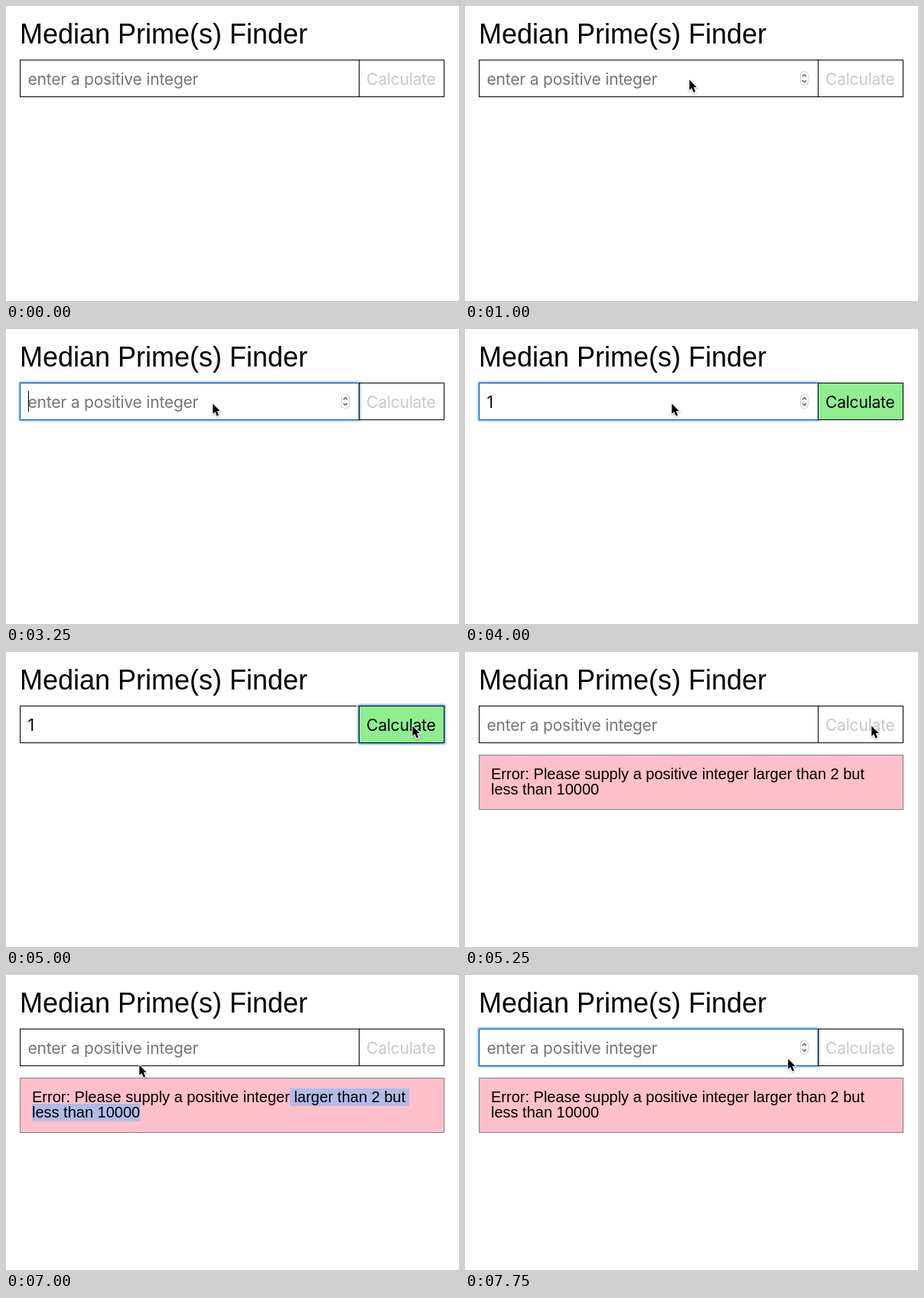
Write an HTML page with a canvas that moves like this. It is 592 px wide and 385 px high and loops after 8000 ms.

```html
<!DOCTYPE html>
<html lang="en">
<head>
<meta charset="utf-8">
<title>Median Prime(s) Finder</title>
<style>
html, body { margin: 0; width: 100%; height: 100%; overflow: hidden; background: #fff; }
canvas { display: block; }
</style>
</head>
<body>
<canvas id="stage" width="592" height="385"></canvas>
<script>
const ctx = document.getElementById('stage').getContext('2d');
const LOOP = 8000;
const SANS = '"Liberation Sans", Arial, sans-serif';
const UI = '21px Inter, sans-serif';

// Pointer: start time, tip x, tip y, shape
const pointer = [
  [250, 372, 49, 'arrow'], [500, 309, 82, 'arrow'], [750, 296, 95, 'arrow'],
  [1000, 293, 96, 'arrow'], [1250, 270, 97, 'arrow'], [4500, 330, 98, 'arrow'],
  [4750, 561, 96, 'arrow'], [5000, 531, 96, 'arrow'], [5750, 298, 174, 'arrow'],
  [6000, 344, 158, 'beam'], [6250, 444, 166, 'beam'], [6500, 521, 180, 'arrow'],
  [6750, 521, 183, 'arrow'], [7000, 174, 117, 'arrow'], [7250, 176, 103, 'arrow'],
  [7500, 300, 106, 'arrow'], [7750, 422, 109, 'arrow']
];

const within = (t, from, to) => t >= from && t < to;
const blink = (t, start) => Math.floor((t - start) / 500) % 2 === 0;

function stateAt(t) {
  const typed = within(t, 3500, 5250);
  const focusStart = t >= 7250 ? 7250 : t >= 3500 ? 3500 : 1250;
  const focused = within(t, 1250, 5000) || t >= 7250;
  return {
    typed,
    focused,
    caret: focused && blink(t, focusStart),
    spinner: focused || within(t, 1000, 1250),
    pressed: within(t, 5000, 5250),
    error: t >= 5250,
    selection: within(t, 6250, 6500) ? 1 : within(t, 6500, 7250) ? 2 : 0,
    pointer: pointer.filter(p => p[0] <= t).pop()
  };
}

function text(str, x, y, font, color, spacing = '0px') {
  ctx.font = font;
  ctx.fillStyle = color;
  ctx.letterSpacing = spacing;
  ctx.fillText(str, x, y);
}

const label = (str, x, color) => text(str, x, 103, UI, color, '-0.2px');

function fill(x, y, w, h, color) {
  ctx.fillStyle = color;
  ctx.fillRect(x, y, w, h);
}

function outline(x, y, w, h, color) {
  ctx.strokeStyle = color;
  ctx.lineWidth = 1;
  ctx.strokeRect(x + 0.5, y + 0.5, w - 1, h - 1);
}

// Soft halo made of one-pixel rounded outlines
function halo(x, y, w, h, colors) {
  ctx.lineWidth = 1;
  colors.forEach((color, i) => {
    const d = i + 0.5;
    ctx.strokeStyle = color;
    ctx.beginPath();
    ctx.roundRect(x - d, y - d, w + 2 * d, h + 2 * d, i + 1);
    ctx.stroke();
  });
}

function drawSpinner() {
  ctx.lineWidth = 1;
  ctx.strokeStyle = '#d2d2d2';
  ctx.fillStyle = '#fff';
  ctx.beginPath();
  ctx.roundRect(438.5, 85.5, 10, 18, 4.5);
  ctx.fill();
  ctx.stroke();
  ctx.strokeStyle = '#444';
  ctx.lineWidth = 1.2;
  ctx.beginPath();
  for (const [y, d] of [[92, -2.5], [97, 2.5]]) {
    ctx.moveTo(441, y);
    ctx.lineTo(443.5, y + d);
    ctx.lineTo(446, y);
  }
  ctx.stroke();
}

function drawInput(s) {
  outline(18, 70, 444, 49, '#000');
  if (s.focused) {
    halo(18, 70, 444, 49, ['#8abdf5', '#c3defb', '#edf5fe']);
    outline(18, 70, 444, 49, '#1767c0');
    outline(19, 71, 442, 47, '#c6dffa');
  }
  if (s.typed) label('1', 28.5, '#000');
  else label('enter a positive integer', 28.5, '#757575');
  if (s.caret) fill(s.typed ? 40 : 29, 81, 1, 27, '#000');
  if (s.spinner) drawSpinner();
}

function drawButton(s) {
  if (s.typed) fill(461, 70, 112, 49, '#90ee90');
  if (s.pressed) halo(461, 70, 112, 49, ['#83bbf8', '#a2cdfb', '#dcecfe']);
  outline(461, 70, 112, 49, '#000');
  label('Calculate', 471, s.typed ? '#000' : '#c8c8c8');
}

function drawError(s) {
  fill(18, 134, 555, 72, '#ffc0cb');
  outline(18, 134, 555, 72, '#808080');
  const blue = '#b1bbe7';
  if (s.selection) fill(371, 148, s.selection === 1 ? 71 : 156, 23, blue);
  if (s.selection === 2) fill(34, 168, 141, 23, blue);
  const font = '20px ' + SANS;
  text('Error: Please supply a positive integer larger than 2 but', 34, 166, font, '#000');
  text('less than 10000', 34, 186, font, '#000');
}

function drawArrow() {
  const points = [[0, 0], [0, 13.2], [3, 10.4], [5.4, 16], [7.8, 15], [5.4, 9.5], [9.5, 9.5]];
  ctx.beginPath();
  points.forEach(([x, y]) => ctx.lineTo(x + 0.3, y + 0.6));
  ctx.closePath();
  ctx.lineJoin = 'miter';
  ctx.strokeStyle = '#fff';
  ctx.lineWidth = 2;
  ctx.shadowColor = 'rgba(0,0,0,.3)';
  ctx.shadowBlur = 2;
  ctx.shadowOffsetY = 1;
  ctx.stroke();
  ctx.shadowColor = 'transparent';
  ctx.fillStyle = '#000';
  ctx.fill();
}

function drawBeam() {
  const trace = (color, width) => {
    ctx.strokeStyle = color;
    ctx.lineWidth = width;
    ctx.beginPath();
    for (const d of [-1, 1]) {
      ctx.moveTo(-2.5, 8 * d);
      ctx.quadraticCurveTo(0.5, 8 * d, 0.5, 6 * d);
      ctx.quadraticCurveTo(0.5, 8 * d, 3.5, 8 * d);
    }
    ctx.moveTo(0.5, -7);
    ctx.lineTo(0.5, 7);
    ctx.moveTo(-1.5, 3.5);
    ctx.lineTo(2.5, 3.5);
    ctx.stroke();
  };
  trace('rgba(255,255,255,.6)', 2.5);
  trace('#000', 1);
}

function drawPointer([, x, y, shape]) {
  ctx.save();
  ctx.translate(x, y);
  if (shape === 'beam') drawBeam();
  else drawArrow();
  ctx.restore();
}

function draw(t) {
  const s = stateAt(t);
  fill(0, 0, 592, 385, '#fff');
  text('Median Prime(s) Finder', 18, 49, '36px ' + SANS, '#000');
  drawInput(s);
  drawButton(s);
  if (s.error) drawError(s);
  if (s.pointer) drawPointer(s.pointer);
}

const start = performance.now();
function tick() {
  draw((performance.now() - start) % LOOP);
  requestAnimationFrame(tick);
}
tick();
</script>
</body>
</html>
```
